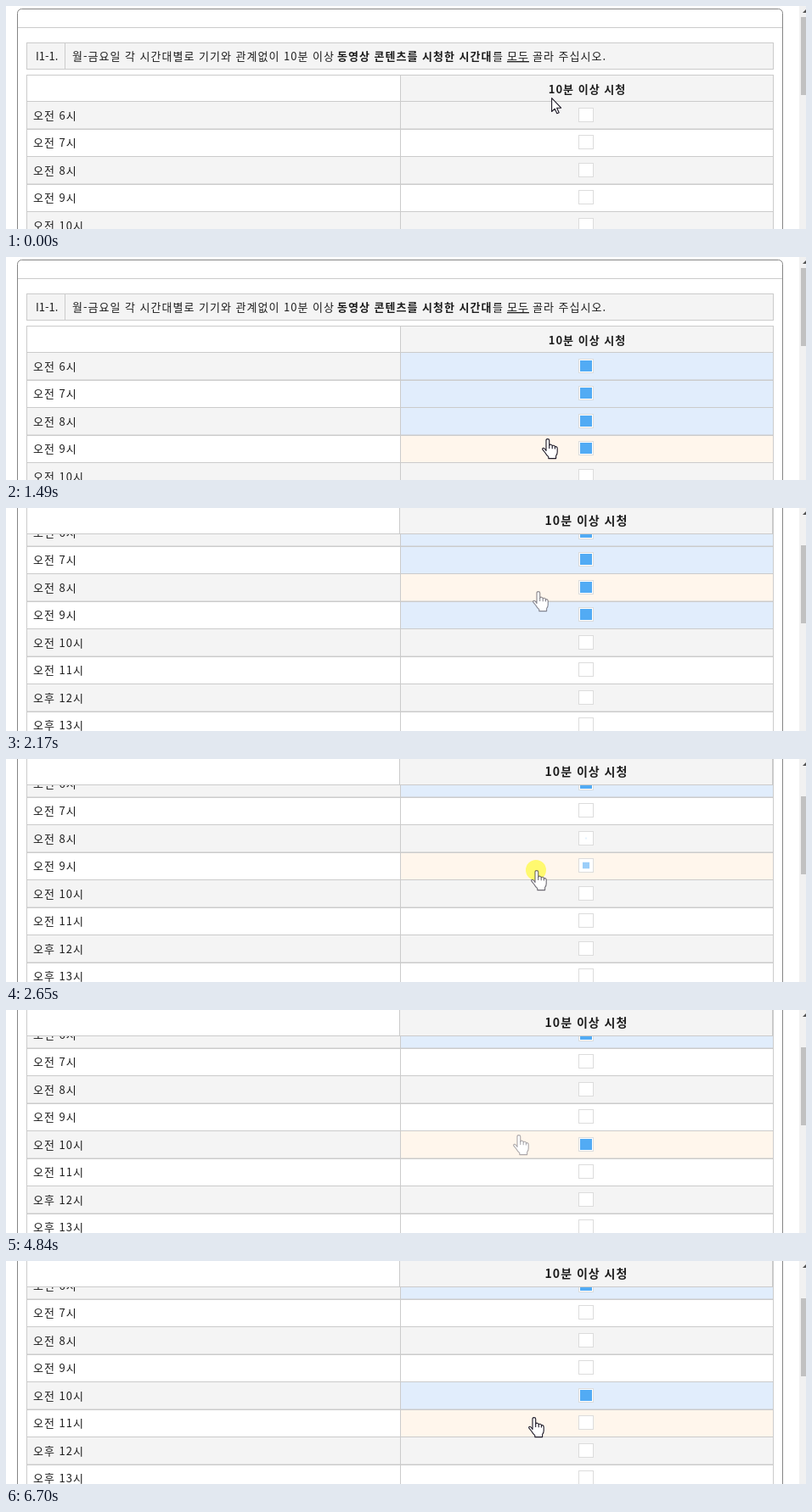
Recreate the animation shown at these times as an HTML page. Size 942x263 px, loop 6770 ms.

```html
<!DOCTYPE html>
<html lang="ko">
<head>
<meta charset="utf-8">
<style>
html, body { margin: 0; width: 100%; height: 100%; overflow: hidden; background: #fff; }
svg { display: block; width: 942px; height: 263px; }
text { font: 13px "Noto Sans CJK KR", "Noto Sans KR", sans-serif; fill: #1c1c1c; letter-spacing: 1px; white-space: pre; }
text.b { font-weight: bold; }
</style>
</head>
<body>
<svg id="stage" viewBox="0 0 942 263"></svg>
<script>
const LOOP = 6770, FRAMES = 100, STEP = LOOP / FRAMES;
const PITCH = 32.5, TOP = 112, FIRST = 6, COUNT = 10;
const LINE = '#cbcbcb', GRAY = '#f4f4f4', HOVER = '#fff6ec', PICKED = '#e1edfc';

const stage = document.getElementById('stage');
function set(el, attrs) {
  for (const k in attrs) el.setAttribute(k, attrs[k]);
}
function add(parent, tag, attrs, content) {
  const el = document.createElementNS('http://www.w3.org/2000/svg', tag);
  set(el, attrs);
  if (content) el.textContent = content;
  parent.appendChild(el);
  return el;
}
const rect = (p, x, y, width, height, fill, stroke = 'none') =>
  add(p, 'rect', { x, y, width, height, fill, stroke });
const line = (p, x1, y1, x2, y2) => add(p, 'line', { x1, y1, x2, y2, stroke: LINE });
const label = (p, x, y, str, attrs = {}) => add(p, 'text', { x, y, ...attrs }, str);
const heading = (p, x, y, size) => label(p, x, y, '10분 이상 시청',
  { class: 'b', 'text-anchor': 'middle', style: `font-size:${size}px` });

// Scrolling page
const page = add(stage, 'g', {});
add(page, 'rect', { x: 13.5, y: 3.5, width: 901, height: 900, rx: 5, fill: '#fff', stroke: '#858585' });
line(page, 14, 25.5, 914, 25.5);
rect(page, 24.5, 43.5, 879, 31, GRAY, LINE);
line(page, 69.5, 44, 69.5, 74);
label(page, 35, 64, 'I1-1.', { style: 'letter-spacing:0' });
label(page, 78, 64, '월-금요일 각 시간대별로 기기와 관계없이 10분 이상');
label(page, 390, 64, '동영상 콘텐츠를 시청한 시간대', { class: 'b' });
label(page, 573, 64, '를');
label(page, 590, 64, '모두', { 'text-decoration': 'underline' });
label(page, 620, 64, '골라 주십시오.');
rect(page, 24.5, 81.5, 879, 31, '#fff', LINE);
rect(page, 464.5, 81.5, 439, 31, GRAY, LINE);
heading(page, 684.5, 103, 13);

const rows = Array.from({ length: COUNT }, (_, i) => {
  const y = Math.round(TOP + i * PITCH) + .5;
  const inner = Math.floor(TOP + i * PITCH) + 10;
  const hour = FIRST + i, base = i % 2 ? '#fff' : GRAY;
  rect(page, 24.5, y, 440, PITCH, base, LINE);
  const cell = rect(page, 464.5, y, 439, PITCH, base, LINE);
  label(page, 32, inner + 12, `${hour < 12 ? '오전' : '오후'} ${hour}시`);
  rect(page, 674.5, inner - 1.5, 17, 16, '#fff', '#dcdcdc');
  const mark = rect(page, 0, 0, 0, 0, '#52abf4');
  return { cell, mark, base, cy: inner + 6.5, flips: [] };
});

// Floating header
const sticky = add(stage, 'g', {});
rect(sticky, 24.5, -1.5, 879, 32, '#fff', LINE);
rect(sticky, 463.5, -1.5, 439, 32, GRAY, LINE);
heading(sticky, 683.5, 20, 14);

// Scrollbar
rect(stage, 934, 0, 8, 263, '#f1f1f1');
add(stage, 'path', { d: 'M938 8 L942 4 V8 Z', fill: '#505050' });
const thumb = rect(stage, 936, 13, 6, 92, '#c1c1c1');

// Pointer
const glow = add(stage, 'circle', { r: 12, fill: '#fffa62' });
const pen = { fill: '#fff', stroke: '#1c1826', 'stroke-width': 1.1, 'stroke-linejoin': 'round' };
const arrow = add(stage, 'path', { ...pen, d: 'M.6 .6 V16.5 L4.2 13.2 L6.8 18.8 L9.2 17.8 L6.6 12.2 H11.6 Z' });
const hand = add(stage, 'g', pen);
add(hand, 'path', { d: 'M-2 14.5 V2.2 Q-2 .6 -.2 .6 Q1.7 .6 1.7 2.2 V8 Q2 7 3.6 7.2 Q5.2 7.4 5.2 8.8 Q5.6 8 7 8.3 Q8.4 8.6 8.4 9.9 Q9 9.3 10.1 9.8 Q11.2 10.4 11.2 12 V16 Q11.2 18.5 9.6 20.5 V23.6 H.8 V21.6 Q-1.5 19.8 -3 17 L-6.1 13.2 Q-6.9 11.6 -5.3 11.2 Q-4 11 -2 14.5 Z' });
add(hand, 'path', { d: 'M1.7 8 V12 M5.2 8.8 V12.2 M8.4 9.9 V12.6', fill: 'none' });

// Turning points of the pointer: time, x, y
const path = [
  [130, 642, 108], [330, 638, 131], [530, 638, 131], [1000, 638, 214], [1880, 638, 214],
  [2166, 627, 98], [2420, 626, 66], [2640, 625, 131], [2800, 621, 146], [3400, 618, 139],
  [3700, 611, 83], [3990, 609, 109], [4400, 606, 117], [4710, 604, 95], [4800, 604, 147],
  [5460, 608, 156], [5620, 621, 184], [LOOP, 622, 184]
];
const presses = [[530, 1150], [2430, 2900], [5640, 5740], [5950, 6040]];

const clamp = v => Math.max(0, Math.min(1, v));
const ease = u => u * u * (3 - 2 * u);
const scrollAt = t => Math.round(100 * ease(clamp((t - 1710) / 220)));

function pointer(t) {
  const i = Math.max(1, path.findIndex(p => p[0] > t));
  const [a, b] = [path[i - 1], path[i]];
  const u = clamp((t - a[0]) / (b[0] - a[0]));
  return [1, 2].map(k => Math.round(a[k] + (b[k] - a[k]) * u));
}
const rowAt = t => Math.floor((pointer(t)[1] + scrollAt(t) - TOP - .5) / PITCH);

// A drag flips every row it enters, once per press
for (const [from, to] of presses) {
  const seen = new Set();
  for (let f = Math.ceil(from / STEP); f * STEP < to; f++) {
    const i = rowAt(f * STEP);
    if (seen.has(i)) continue;
    seen.add(i);
    rows[i].flips.push(f * STEP);
  }
}

function check(flips, t) {
  const done = flips.filter(at => at <= t);
  const on = done.length % 2 === 1;
  const u = done.length ? clamp((t - done[done.length - 1]) / 160) : 1;
  return { on, size: on ? u : 1 - u };
}

function draw(time) {
  const t = Math.floor((time + 12) / STEP) * STEP;
  const scroll = scrollAt(t), over = rowAt(t);
  const [px, py] = pointer(t), [qx, qy] = pointer(t - STEP);

  set(page, { transform: `translate(0 ${-scroll})` });
  set(sticky, { visibility: scroll > 81 ? 'visible' : 'hidden' });
  set(thumb, { y: 13 + Math.round(scroll * .31) });

  rows.forEach((r, i) => {
    const { on, size } = check(r.flips, t), w = 14 * size, h = 13 * size;
    set(r.cell, { fill: i === over ? HOVER : on ? PICKED : r.base });
    set(r.mark, { x: 683 - w / 2, y: r.cy - h / 2, width: w, height: h, opacity: size });
  });

  const press = Math.max(...presses.map(([from, to]) => t < from ? 0 : 1 - clamp((t - to) / 70)));
  set(glow, { cx: px - 1, cy: py, opacity: press * .9 });

  // The outline pales while the pointer moves fast
  const at = {
    transform: `translate(${px} ${py})`,
    'stroke-opacity': clamp(1 - Math.hypot(px - qx, py - qy) / 55)
  };
  set(arrow, { ...at, visibility: over < 0 ? 'visible' : 'hidden' });
  set(hand, { ...at, visibility: over < 0 ? 'hidden' : 'visible' });
}

const start = performance.now();
function tick() {
  draw((performance.now() - start) % LOOP);
  requestAnimationFrame(tick);
}
tick();
</script>
</body>
</html>
```
